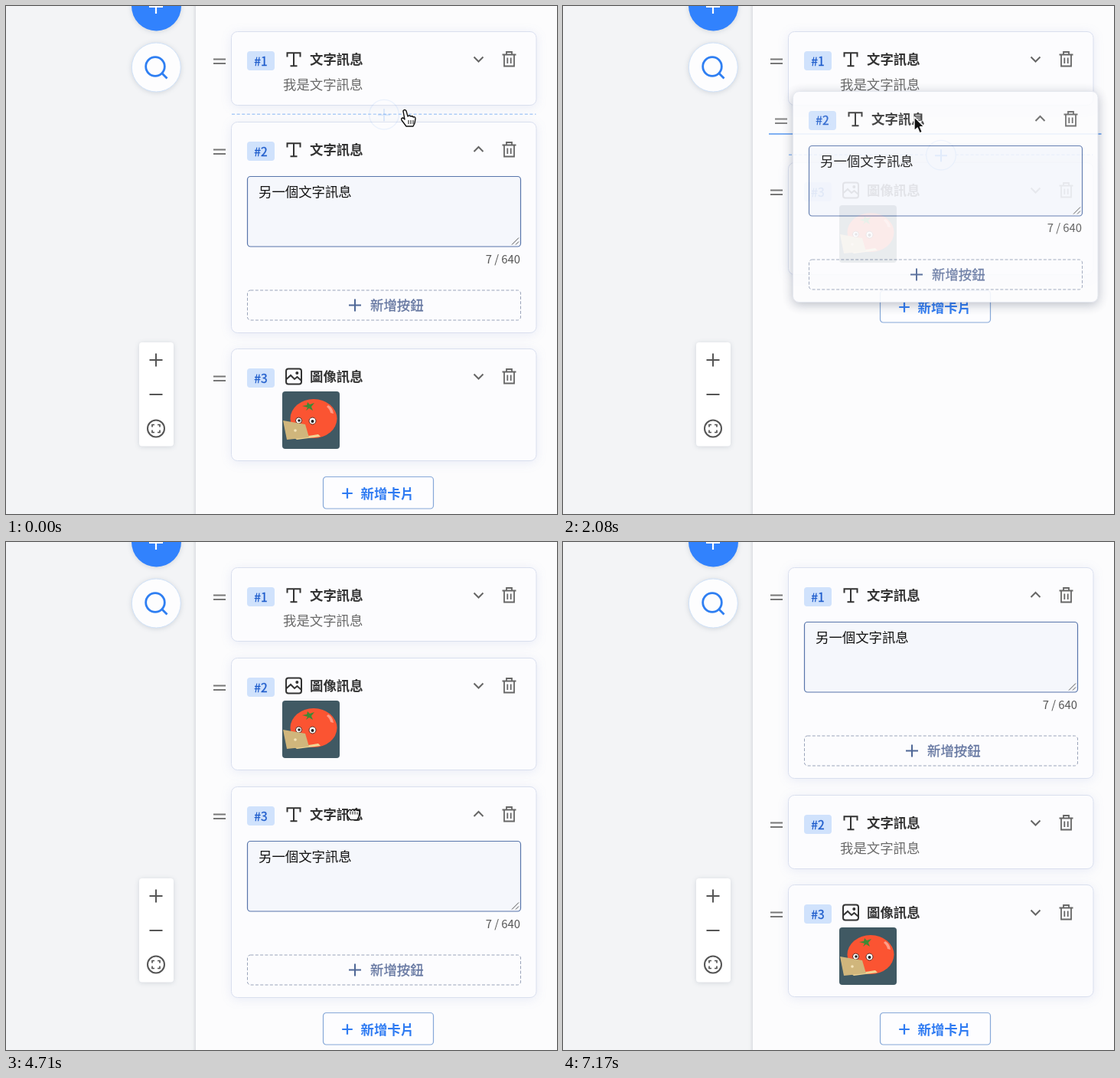
Recreate the animation shown at these times as an HTML page. Size 720 by 663 pixels, loop 7210 ms.

```html
<!DOCTYPE html>
<html lang="zh-Hant">
<head>
<meta charset="utf-8">
<title>Card sorting</title>
<style>
html, body { margin: 0; width: 100%; height: 100%; overflow: hidden; background: #f3f4f6; }
svg { display: block; width: 720px; height: 663px; font-family: "Noto Sans CJK TC", "Noto Sans CJK JP", "Noto Sans CJK", sans-serif; font-size: 17.4px; }
.ln { fill: none; stroke: #666; stroke-width: 2; }
.box { fill: #fcfcfe; stroke: #d9dfee; filter: drop-shadow(0 2px 7px rgba(70, 100, 190, .11)); }
.drag .box { stroke: #e3e6ee; filter: drop-shadow(0 3px 7px rgba(50, 60, 85, .36)); }
.title { font-weight: 700; fill: #333; }
.mid { font-weight: 500; stroke-width: .3; }
.soft { filter: drop-shadow(0 1px 3px rgba(40, 60, 90, .16)); }
</style>
</head>
<body>
<svg id="stage" viewBox="0 0 720 663">
  <rect width="720" height="663" fill="#f3f4f6"/>
  <rect x="248" y="-20" width="500" height="710" fill="#fcfcfd" style="filter:drop-shadow(-1px 0 2px rgba(60,70,90,.18))"/>
  <g id="side"></g>
  <g id="list"></g>
  <g id="gaps"></g>
  <g id="scroll">
    <path d="M705.5 13V663" stroke="#ececee"/>
    <rect x="710" y="15" width="12" height="322" rx="5" fill="#b5b5b7"/>
  </g>
  <g id="over"></g>
  <g id="cursor" stroke-linejoin="round"></g>
</svg>
<script>
const LOOP = 7210, MOVE = 245, LAG = 40, GRAB = [159, 35.5];
const $ = id => document.getElementById(id);
const clamp = v => Math.max(0, Math.min(1, v));
const smooth = v => (v = clamp(v), v * v * (3 - 2 * v));
const mix = (a, b, k) => a + (b - a) * k;
const cross = (x, y, r, color, w = 2) =>
  `<path d="M${x - r} ${y}h${2 * r}M${x} ${y - r}v${2 * r}" fill="none" stroke="${color}" stroke-width="${w}"/>`;

function group(parent, html, cls = '') {
  const g = document.createElementNS('http://www.w3.org/2000/svg', 'g');
  g.setAttribute('class', cls);
  g.innerHTML = html;
  $(parent).append(g);
  return g;
}
const place = (el, x, y) => el.setAttribute('transform', `translate(${x.toFixed(2)} ${y.toFixed(2)})`);
const show = (el, o) => {
  el.style.display = o > 0 ? '' : 'none';
  el.style.opacity = o;
};

// Side controls
$('side').innerHTML = `
  <circle class="soft" cx="196.5" cy="0" r="32.5" fill="#3182fd"/>${cross(196, 1, 9, '#fff', 2.2)}
  <circle class="soft" cx="196.3" cy="80" r="32" fill="#fdfdfe" stroke="#cfe1f8"/>
  <g fill="none" stroke="#2f7ff2" stroke-width="2.8"><circle cx="195" cy="79" r="12.3"/><path d="M203.5 87.5l7 7"/></g>
  <rect class="soft" x="174" y="439" width="45" height="135.5" rx="4" fill="#fff"/>
  ${cross(196, 462, 8.5, '#555')}
  <g class="ln" style="stroke:#555"><path d="M187.5 507h17"/><circle cx="196" cy="551.5" r="11"/>
  <path d="M191 549.5v-3h3M198 546.5h3v3M201 553.5v3h-3M194 556.5h-3v-3" stroke-width="1.7"/></g>`;

// Card parts, placed from the card's top left corner
const ICON = {
  text: '<path class="ln" style="stroke:#333" d="M73.5 33.5V28.3H90.5V33.5M82 28.3V45.2M77.5 45.2h9"/>',
  image: `<g class="ln" style="stroke:#333"><rect x="72" y="26.5" width="20" height="20" rx="3"/>
    <path d="M72.5 40l5.5-5 5 5 3.5-3 5.5 5"/><circle cx="86.3" cy="32" r="1" /></g>`
};
const PICTURE = `
  <rect x="67" y="56" width="75" height="75" rx="4" fill="#405963"/>
  <ellipse cx="108" cy="91.5" rx="30.5" ry="25.5" fill="#fb5432"/>
  <path d="M127 74q6 3 7 11l-4-1q-1-5-5-8z" fill="#ff9c86"/>
  <path d="M100 77l-7-2 6-1 1-4 3 3 6-2-4 5 2 5-5-3-4 3z" fill="#3f8a35"/>
  <g fill="#fff" stroke="#5a2a20"><circle cx="88.5" cy="94" r="4"/><circle cx="106.5" cy="94.5" r="4.5"/></g>
  <circle cx="89" cy="94" r="1.8" fill="#222"/><circle cx="106.5" cy="95" r="2" fill="#222"/>
  <path d="M83 117l31-5 3 3-31 4z" fill="#f1d594"/>
  <path d="M68 94l29 5 5 17-29 3z" fill="#d0b67c"/><circle cx="84" cy="107" r="1.8" fill="#f5e4b8"/>`;
const EDITOR = `
  <rect x="21.5" y="71.5" width="357" height="91.5" rx="4" fill="#f5f7fc" stroke="#5875ab" stroke-width="1.2"/>
  <path d="M367 160.5l9-9M372 160.5l4-4" stroke="#555"/>
  <text x="36" y="98" fill="#111">另一個文字訊息</text>
  <text x="378" y="184.5" text-anchor="end" font-size="14.8" fill="#555">7 / 640</text>
  <rect x="21.5" y="220" width="357" height="39" rx="4" fill="none" stroke="#9aa4ba" stroke-dasharray="4 2.3"/>
  ${cross(162, 239.5, 8, '#4f6796')}
  <text class="mid" x="182" y="246.3" fill="#6476a0" stroke="#6476a0">新增按鈕</text>`;

function card(parent, kind, title, height, open, body) {
  const el = group(parent, `
    <rect class="box" x=".5" y=".5" width="398.5" height="${height}" rx="8"/>
    <path class="ln" style="stroke:#777" d="M-23 36.5h16M-23 42h16"/>
    <rect x="21" y="26" width="36" height="25" rx="4" fill="#d0e2fc"/>
    <text class="mid num" x="39" y="44.5" text-anchor="middle" font-size="15.6" fill="#1f5dcc" stroke="#1f5dcc"></text>
    ${ICON[kind]}<text class="title" x="103" y="43.4">${title}</text>
    <g class="tools ln"><path d="${open ? 'M317.5 39l6-6 6 6' : 'M317.5 33.5l6 6 6-6'}"/>
      <path d="M354.5 30.5h18M360 30v-3h7v3M357 31v14.5h13V31M361.3 34.5v7.5M365.7 34.5v7.5" stroke-width="1.8"/></g>
    ${body}`);
  return { el, num: el.querySelector('.num'), box: el.querySelector('.box'), tools: el.querySelector('.tools') };
}
const label = (c, n) => { c.num.textContent = '#' + n; };
const squeeze = (c, d) => {
  c.box.setAttribute('width', 398.5 - d);
  place(c.tools, -d, 0);
};

const first = card('list', 'text', '文字訊息', 96, false, '<text x="68" y="75.7" fill="#6a6a6a">我是文字訊息</text>');
const second = card('list', 'text', '文字訊息', 275, true, EDITOR);
const photo = card('list', 'image', '圖像訊息', 146, false, PICTURE);
const slot = group('list', '<path d="M269 0H703.5" stroke="#7fb0f3" stroke-width="2.2"/>');
const add = group('list', `<rect x=".5" y=".5" width="144" height="41.5" rx="4" fill="#fdfdff" stroke="#86a8d8" stroke-width="1.2"/>
  ${cross(32, 22, 6.8, '#2f7bf2', 2.2)}<text x="49.5" y="28.5" font-weight="700" fill="#2f7bf2">新增卡片</text>`);
const held = card('over', 'text', '文字訊息', 275, true, EDITOR);
held.el.setAttribute('class', 'drag');

const gapLine = group('gaps', '<path d="M295 0H692.5" stroke="#93bdf6" stroke-width="1.6" stroke-dasharray="4 2.6"/>');
const gapPlus = group('gaps', `<circle cx="494" r="19.3" fill="#fcfdff" stroke="#82b2f6" stroke-width="1.3"/>${cross(494, .5, 8, '#2f7ff2')}`);

// Cursors, drawn from the hot spot
const HAND = 'fill="#fff" stroke="#111" stroke-width="1.4"';
const pointers = {
  point: group('cursor', `<path ${HAND} d="M-2 1q2-3 4 0l2 7q2-2 4 0 2-1 3 1 3-1 3 2l-1 6-2 4H2L-4 13q-1-3 2-3l2 2z"/><path d="M5 13v5M8 13v5M11 13v5" stroke="#111"/>`),
  grab: group('cursor', `<path ${HAND} d="M-6-3q2-4 4-1 2-3 4 0 2-2 4 0 3-1 3 2l-1 6-2 4H-3l-3-4q-3-4 0-7z"/><path d="M-3-3v4M0-3v4M3-3v4M6-2v3" stroke="#111"/>`),
  arrow: group('cursor', '<path fill="#111" stroke="#fff" stroke-width="1.3" d="M0-1V17L4.2 13.2 7 20 10.3 18.6 7.5 12H13Z"/>')
};

// time, first, second, photo, slot, add button
const N = null;
const STATES = [
  [-999, 33, 151, 447, N, 614],
  [795, 33, N, 204, 167, 371],
  [1390, 33, N, 151, 335, 371],
  [1760, 33, N, 204, 167, 371],
  [2260, 86, N, 204, 49, 371],
  [2860, 33, N, 204, 167, 371],
  [3122, 33, N, 151, 335, 371],
  [4080, 33, 319, 151, N, 614],
  [4950, 33, N, 151, 335, 371],
  [5280, 33, N, 204, 167, 371],
  [5588, 86, N, 204, 49, 371],
  [6300, 330, 33, 447, N, 614]
];
const PATH = [
  [0, 521, 136], [150, 520, 138], [450, 456, 184], [790, 453, 187], [1000, 453, 199], [1040, 454, 196],
  [1200, 454, 190], [1400, 455, 255], [1540, 458, 325], [1680, 460, 345], [1850, 460, 205], [2040, 459, 146.5],
  [2080, 459, 146], [2250, 460, 105], [2450, 462, 75], [2800, 464, 68], [3000, 464, 105], [3130, 465, 155],
  [3250, 467, 239.5], [3290, 467, 243], [3450, 468, 262], [3750, 467, 264], [4000, 460, 335], [4080, 458, 345],
  [4400, 453, 354], [4920, 453, 355], [5000, 454, 350], [5250, 462, 275], [5500, 472, 195], [5630, 476, 120.5],
  [5670, 471, 101], [5800, 472, 72], [6000, 470, 66], [6300, 460, 68], [6700, 458, 72], [6830, 462, 90], [7130, 486, 690]
];
// owner column in STATES, start, end
const HOVERS = [[2, -110, 330], [3, 1800, 2200], [3, 2950, 3163]];

function cursorAt(t) {
  let i = 0;
  while (i < PATH.length - 2 && PATH[i + 1][0] <= t) i++;
  const a = PATH[i], b = PATH[i + 1], k = clamp((t - a[0]) / (b[0] - a[0]));
  return [mix(a[1], b[1], k), mix(a[2], b[2], k)];
}

function drawGap(t, yOf, shift) {
  let line = 0, plus = 0;
  for (const [col, on, off] of HOVERS) {
    const l = Math.min(clamp((t - on) / 150), 1 - clamp((t - off) / 150));
    const p = Math.min(clamp((t - on - 90) / 150), 1 - clamp((t - off - 120) / 150));
    if (l <= 0 && p <= 0) continue;
    line = l;
    plus = p;
    place(gapLine, -shift, yOf(col) - 9.7);
    place(gapPlus, -shift / 2, yOf(col) - 9.3);
  }
  show(gapLine, line);
  show(gapPlus, plus);
}

function draw(t) {
  let i = STATES.length - 1;
  while (STATES[i][0] > t) i--;
  const now = STATES[i], old = STATES[Math.max(0, i - 1)], age = t - now[0], k = smooth(age / MOVE);
  const yOf = c => now[c] === N ? old[c] : old[c] === N ? now[c] : mix(old[c], now[c], k);
  const dragging = now[2] === N, rank = t < 4080 ? [1, 2, 3] : t < 6300 ? [1, 3, 2] : [2, 1, 3];
  const scrolling = t >= 3122 && t < 3122 + MOVE + 40, shift = scrolling ? 8.5 : 0;

  [first, second, photo].forEach((c, n) => {
    label(c, rank[n]);
    squeeze(c, shift);
    if (c !== second) place(c.el, 294, yOf(n + 1));
  });
  const lifted = dragging && old[2] !== N;
  if (yOf(2) !== N) place(second.el, 294, yOf(2));
  show(second.el, dragging ? (lifted ? 1 - clamp(age / 450) : 0) : i ? clamp(age / 150) : 1);

  show(slot, now[4] === N ? 0 : 1);
  if (now[4] !== N) place(slot, 0, yOf(4));
  $('list').insertBefore(slot, now[4] === 49 ? first.el : add);
  place(add, 414 - shift, now[5]);
  drawGap(t, yOf, shift);
  show($('scroll'), scrolling ? 1 : 0);

  const [x, y] = cursorAt(t), [hx, hy] = cursorAt(t - LAG);
  label(held, rank[1]);
  show(held.el, dragging ? .9 : 0);
  place(held.el, hx - GRAB[0], hy - GRAB[1]);

  const kind = dragging || t > 6760 ? 'arrow' : t < 330 ? 'point' : 'grab';
  for (const name in pointers) show(pointers[name], name === kind ? 1 : 0);
  place($('cursor'), x, y);
}

const start = performance.now();
function tick() {
  draw((performance.now() - start) % LOOP);
  requestAnimationFrame(tick);
}
tick();
</script>
</body>
</html>
```
